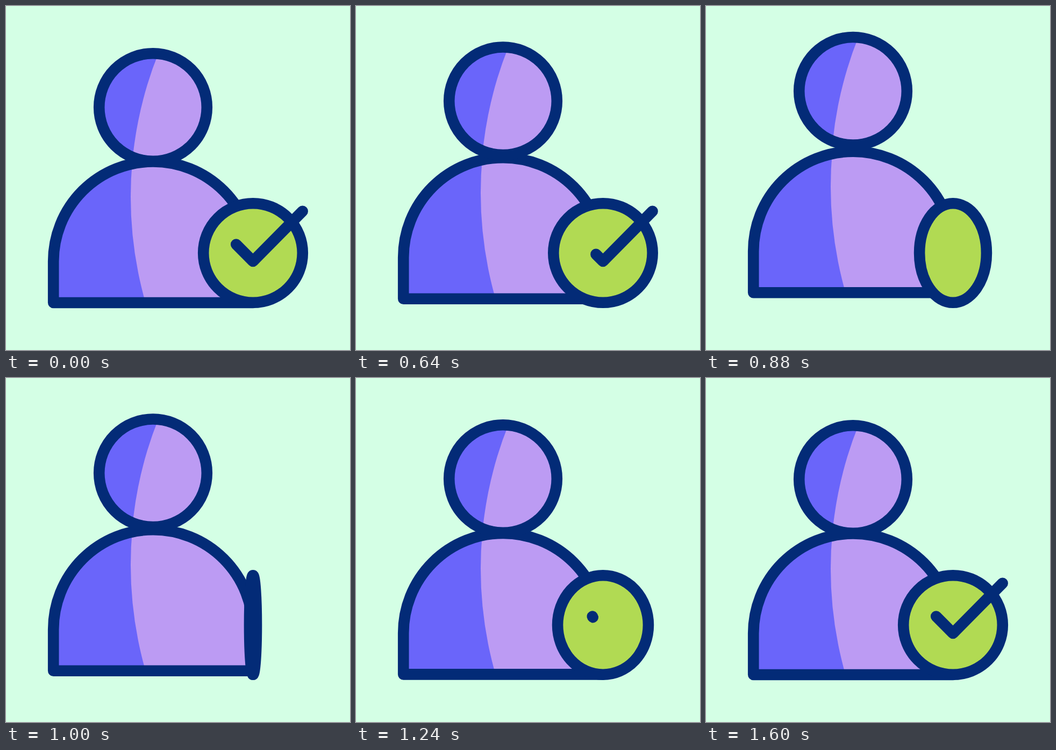
Recreate the animation shown at these times as an HTML page. Size 640 px wide and 640 px high, loop 2200 ms.

```html
<!DOCTYPE html>
<html lang="en">
<head>
<meta charset="utf-8">
<title>Verified user</title>
<style>
  html, body { margin: 0; width: 100%; height: 100%; overflow: hidden; background: #d4ffe5; }
  svg { display: block; width: 100%; height: 100%; }
  .line { fill: none; stroke: #032b77; stroke-width: 20.6; stroke-linecap: round; stroke-linejoin: round; }
  .shade { fill: #6a65fa; }
  .light { fill: #bc9bf3; }
  #disc { fill: #b1da53; }
</style>
</head>
<body>
<svg viewBox="0 0 640 640">
  <defs>
    <circle id="headShape" cx="273.5" cy="188.5" r="100.3"/>
    <path id="bodyShape" d="M88.2 552V475A185.6 185.6 0 0 1 459.4 475V552Z"/>
    <circle id="glow" cx="950" cy="355" r="718"/>
    <clipPath id="headClip"><use href="#headShape"/></clipPath>
    <clipPath id="bodyClip"><use href="#bodyShape"/></clipPath>
  </defs>
  <g id="body">
    <use href="#bodyShape" class="shade"/>
    <g clip-path="url(#bodyClip)"><use href="#glow" class="light"/></g>
    <use href="#bodyShape" class="line"/>
  </g>
  <g id="head">
    <use href="#headShape" class="shade"/>
    <g clip-path="url(#headClip)"><use href="#glow" class="light"/></g>
    <use href="#headShape" class="line"/>
  </g>
  <ellipse id="disc" class="line" cx="459.5" cy="459.5" rx="92.3" ry="92.3"/>
  <path id="check" class="line" pathLength="1"/>
</svg>
<script>
  const LOOP = 2200, STEP = 40;
  const CENTER = 459.5, RADIUS = 92.3;
  const HEAD_RISE = 30.2, BODY_RISE = 18.8;
  const EDGE_ON = 1010;   // moment the badge is seen from the side
  const REDRAW = 1238;    // moment the tick starts to reappear

  const [head, body, disc, check] = ['head', 'body', 'disc', 'check'].map(id => document.getElementById(id));

  const progress = (t, from, to) => Math.min(1, Math.max(0, (t - from) / (to - from)));
  const easeIn = (u, power) => u ** power;
  const easeOut = (u, power) => 1 - (1 - u) ** power;
  const easeInOut = u => (1 - Math.cos(Math.PI * u)) / 2;

  // [time, height] of the jump
  const jump = [[460, 0], [880, 1], [1085, 0.033], [1240, 0.033], [1520, 0]];

  function jumpHeight(t) {
    return jump.slice(1).reduce((height, [time, value], i) => {
      const [start, previous] = jump[i];
      return height + (value - previous) * easeInOut(progress(t, start, time));
    }, 0);
  }

  function badgeWidth(t) {
    return t < EDGE_ON
      ? easeOut(progress(EDGE_ON - t, 0, 415), 3)
      : easeOut(progress(t, EDGE_ON, EDGE_ON + 500), 4);
  }

  function drawCheck(t, badge) {
    const leaving = t < EDGE_ON;
    const width = leaving ? badge : easeOut(progress(t, 1154, 1560), 4.2);
    const from = leaving ? easeIn(progress(t, 460, 860), 2.4) : 0;
    const to = leaving ? 1 : easeOut(progress(t, REDRAW, 1580), 2.1);
    const x = dx => CENTER + dx * width;

    check.setAttribute('d', `M${x(-31.3)} 443.6L${x(0)} 475L${x(92.2)} 381.8`);
    check.setAttribute('stroke-dasharray', `${to - from} 2`);
    check.setAttribute('stroke-dashoffset', -from);
    check.setAttribute('visibility', to > from ? 'visible' : 'hidden');
  }

  function render(t) {
    const height = jumpHeight(t);
    const badge = badgeWidth(t);
    head.setAttribute('transform', `translate(0 ${-HEAD_RISE * height})`);
    body.setAttribute('transform', `translate(0 ${-BODY_RISE * height})`);
    disc.setAttribute('rx', Math.max(0.01, RADIUS * badge));
    drawCheck(t, badge);
  }

  const start = performance.now();
  function frame() {
    const t = (performance.now() - start) % LOOP;
    render(Math.floor(t / STEP) * STEP);
    requestAnimationFrame(frame);
  }
  frame();
</script>
</body>
</html>
```
